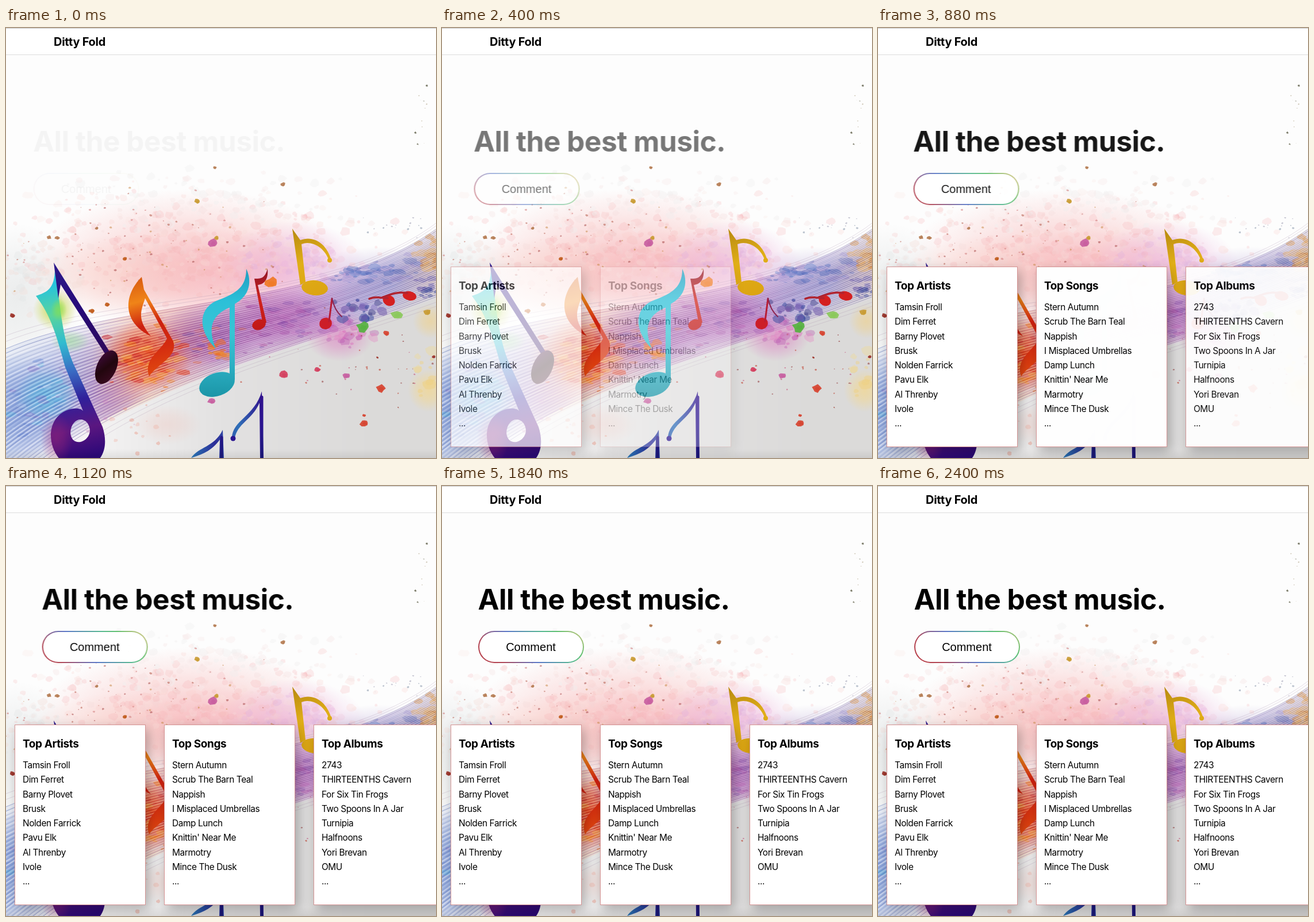
These frames come from a looping animation (748 px wide and 748 px high, 2480 ms). An HTML page with a canvas:

```html
<!DOCTYPE html>
<html lang="en">
<head>
<meta charset="utf-8">
<title>Ditty Fold</title>
<style>
  html, body { margin: 0; width: 100%; height: 100%; overflow: hidden; background: #fdfdfd; }
  body { position: relative; font-family: Inter, "Open Sans", sans-serif; color: #000; }
  canvas { position: absolute; left: 0; top: 0; width: 748px; height: 748px; }

  header {
    position: absolute; left: 0; top: 0; width: 748px; height: 47px; box-sizing: border-box;
    background: #fff; border-top: 1px solid #c9c9c9; border-bottom: 1px solid #dcdcdc;
  }
  header b { position: absolute; left: 83px; top: 13px; font-size: 20px; line-height: 20px; letter-spacing: -.3px; }

  .hero {
    position: absolute; left: 62.5px; top: 169px;
    animation: slide 2480ms infinite;
    animation-timing-function: linear(.035, .2 6.5%, .53 16.1%, .81 25.8%, .91 35.5%, .98 45%, 1 55%, 1);
  }
  h1 { margin: 0; font-size: 49.6px; line-height: 56px; font-weight: 700; letter-spacing: -.5px; white-space: nowrap; }
  .button {
    position: absolute; left: 0; top: 83px; width: 184px; height: 56px; box-sizing: border-box;
    border: 2px solid transparent; border-radius: 28px;
    font: 20px/52px "Liberation Sans", Arial, sans-serif; text-align: center;
    background:
      linear-gradient(#fff, #fff) padding-box,
      linear-gradient(45deg, #b8404a 8%, #b04858 20%, #5a78c8 42%, #55b890 64%, #5fc070 74%, #d8c480 92%) 0 0 / 120% 100% border-box;
    animation: hue 2480ms linear infinite;
  }

  .card {
    position: absolute; top: 415px; width: 228px; height: 314px; box-sizing: border-box;
    padding: 20px 0 0 13px; border: 1px solid #d69494; background: #fff;
    box-shadow: 5px 8px 20px rgba(0, 0, 0, .28);
    animation: 2480ms infinite;
  }
  .card:nth-of-type(1) { left: 15px; animation-name: first; }
  .card:nth-of-type(2) { left: 275px; animation-name: second; }
  .card:nth-of-type(3) { left: 535px; animation-name: third; }
  h2 { margin: 0 0 12px; font-size: 19px; line-height: 25px; font-weight: 700; letter-spacing: -.4px; }
  ul { margin: 0; padding: 0; list-style: none; font-size: 15.4px; line-height: 25.25px; letter-spacing: -.4px; white-space: nowrap; }

  @keyframes slide { from { opacity: 0; transform: translateX(-16px); } to { opacity: 1; transform: none; } }
  @keyframes hue { from { background-position: 0 0, 90% 0; } to { background-position: 0 0, 10% 0; } }
  @keyframes first { 0%, 4.84% { opacity: 0; animation-timing-function: ease; } 32.3%, 100% { opacity: 1; } }
  @keyframes second { 0%, 10.9% { opacity: 0; animation-timing-function: ease; } 38.3%, 100% { opacity: 1; } }
  @keyframes third { 0%, 16.9% { opacity: 0; animation-timing-function: ease; } 44.4%, 100% { opacity: 1; } }
</style>
</head>
<body>
<canvas width="748" height="748"></canvas>
<header><b>Ditty Fold</b></header>
<div class="hero">
  <h1>All the best music.</h1>
  <div class="button">Comment</div>
</div>
<section class="card">
  <h2>Top Artists</h2>
  <ul><li>Tamsin Froll<li>Dim Ferret<li>Barny Plovet<li>Brusk<li>Nolden Farrick<li>Pavu Elk<li>Al Threnby<li>Ivole<li>...</ul>
</section>
<section class="card">
  <h2>Top Songs</h2>
  <ul><li>Stern Autumn<li>Scrub The Barn Teal<li>Nappish<li>I Misplaced Umbrellas<li>Damp Lunch<li>Knittin' Near Me<li>Marmotry<li>Mince The Dusk<li>...</ul>
</section>
<section class="card">
  <h2>Top Albums</h2>
  <ul><li>2743<li>THIRTEENTHS Cavern<li>For Six Tin Frogs<li>Two Spoons In A Jar<li>Turnipia<li>Halfnoons<li>Yori Brevan<li>OMU<li>...</ul>
</section>

<script>
const ctx = document.querySelector('canvas').getContext('2d');
const TAU = Math.PI * 2;

let seed = 41;
const rnd = () => {
  seed = (seed * 1664525 + 1013904223) >>> 0;
  return seed / 4294967296;
};
const spread = () => rnd() + rnd() + rnd() - 1.5;
const pick = list => list[Math.floor(rnd() * list.length)];

function ramp(x0, y0, x1, y1, stops) {
  const g = ctx.createLinearGradient(x0, y0, x1, y1);
  stops.forEach((c, i) => g.addColorStop(i / (stops.length - 1), c));
  return g;
}

// Soft elliptical stain
function wash(x, y, rx, ry, color, alpha) {
  ctx.save();
  ctx.translate(x, y);
  ctx.scale(rx, ry);
  const g = ctx.createRadialGradient(0, 0, 0, 0, 0, 1);
  g.addColorStop(0, color);
  g.addColorStop(.45, color + 'b0');
  g.addColorStop(1, color + '00');
  ctx.globalAlpha = alpha;
  ctx.fillStyle = g;
  ctx.fillRect(-1, -1, 2, 2);
  ctx.restore();
}

// Ragged patch of paint
function blot(x, y, r, color, alpha = 1, flat = .8) {
  ctx.globalAlpha = alpha;
  ctx.fillStyle = color;
  ctx.beginPath();
  for (let i = 0; i < 9; i++) {
    const a = i / 9 * TAU, d = r * (.75 + rnd() * .5);
    ctx.lineTo(x + d * Math.cos(a), y + d * Math.sin(a) * flat);
  }
  ctx.fill();
  ctx.globalAlpha = 1;
}

function spray(n, x, y, sx, sy, r, colors, alpha, flat) {
  for (let i = 0; i < n; i++) {
    blot(x + spread() * sx, y + spread() * sy, r * (.3 + rnd()), pick(colors), alpha, flat);
  }
}

function shape(d, fill) {
  ctx.fillStyle = fill;
  ctx.fill(new Path2D(d));
}

function line(d, width, color) {
  ctx.lineWidth = width;
  ctx.strokeStyle = color;
  ctx.stroke(new Path2D(d));
}

function oval(x, y, rx, ry, turn, fill) {
  ctx.fillStyle = fill;
  ctx.beginPath();
  ctx.ellipse(x, y, rx, ry, turn, 0, TAU);
  ctx.fill();
}

// Stave lanes run between an upper (k = 0) and a lower (k = 1) curve
const upper = [-5, 560, 200, 470, 560, 490, 755, 345];
const lower = [-5, 815, 200, 615, 480, 570, 755, 465];
const lane = k => upper.map((v, i) => v + (lower[i] - v) * k);
const lanePath = k => {
  const [x, y, ...rest] = lane(k);
  return `M${x} ${y}C${rest}`;
};
const ribbon = (a, b) => {
  const p = lane(b);
  return `${lanePath(a)}L${p[6]} ${p[7]}C${p[4]} ${p[5]} ${p[2]} ${p[3]} ${p[0]} ${p[1]}Z`;
};

function paper() {
  ctx.fillStyle = '#fdfdfd';
  ctx.fillRect(0, 0, 748, 748);
  ctx.filter = 'blur(9px)';
  shape(lanePath(.85) + 'L770 480V770H0Z', ramp(120, 0, 640, 0, ['#f6f5f5', '#e2e1e1', '#dbdad9']));
  ctx.filter = 'none';
  wash(20, 470, 120, 130, '#dfe2e2', .6);
  wash(320, 405, 270, 125, '#f8bcbc', .68);
  wash(370, 430, 180, 80, '#f5a3b0', .45);
  wash(500, 420, 130, 85, '#e6a6d8', .55);
  wash(650, 430, 120, 50, '#c3b5dc', .5);
  wash(200, 430, 160, 70, '#f7c0b4', .35);
  spray(480, 310, 385, 290, 95, 7, ['#f6b8b8', '#f9cfc9', '#f5abb0', '#fbe3df', '#f3d6d6'], .22);
  spray(90, 350, 300, 240, 50, 7, ['#f1eeee', '#f8ecec', '#f1f0f0'], .4);
  spray(80, 50, 430, 80, 50, 7, ['#e3e4e4', '#eceaea', '#f3dcd8'], .35);
  spray(70, 520, 400, 90, 40, 7, ['#eab4de', '#f2c4dc', '#dcaee0'], .28);
}

function stave() {
  const hues = ramp(0, 0, 748, 0, ['#9fb2e0', '#8a9cd6', '#a086bd', '#dc6a58', '#c0688a', '#9a60a8', '#a868b4', '#b884c6', '#9a90cc', '#8a8cc8', '#c0a09c']);
  ctx.globalAlpha = .2;
  for (let i = 0; i < 6; i++) shape(ribbon(.08 * i, .97 - .06 * i), hues);
  ctx.globalAlpha = 1;

  ctx.save();
  ctx.clip(new Path2D(ribbon(0, .98)));
  wash(20, 655, 120, 90, '#6f8ed2', .6);
  wash(70, 640, 55, 50, '#55bde0', .7);
  wash(245, 570, 80, 60, '#e84a1c', .9);
  wash(180, 650, 70, 60, '#a06ac0', .5);
  wash(350, 535, 90, 55, '#8c409a', .5);
  wash(480, 505, 110, 50, '#a34aa0', .55);
  spray(45, 60, 645, 60, 60, 9, ['#5cbfe2', '#6d8cd4', '#8a78c8', '#b8c8ec'], .4, .4);
  spray(70, 245, 575, 65, 45, 10, ['#e8380e', '#f47a1a', '#d42a2a', '#f6a03c'], .55, .4);
  spray(60, 370, 545, 80, 40, 9, ['#8c449c', '#b0509a', '#e07040', '#6a4aa8', '#c88ac8'], .45, .35);
  spray(55, 490, 500, 90, 35, 9, ['#9a3e9c', '#b85ab0', '#7a4aa8', '#c67cc0'], .4, .4);
  spray(40, 650, 425, 80, 25, 10, ['#4a62b4', '#6a86cc', '#8a7ac4', '#a79ad4'], .45, .4);
  spray(30, 738, 395, 30, 25, 10, ['#e8a044', '#d88430', '#f0bc70'], .6, .6);
  spray(20, 735, 455, 25, 18, 8, ['#2f3f94', '#4a3a98', '#6a62b0'], .55, .5);
  ctx.restore();

  const ink = ramp(0, 0, 748, 0, ['#3f5cae', '#4a3c9c', '#a83a3c', '#7a2f80', '#7c3488', '#6f5a98', '#54548c']);
  const light = ramp(0, 0, 748, 0, ['#f4f7ff', '#ece8fa', '#f6c49c', '#dcb0dc', '#d9a6dc', '#d2c0e8', '#e0d4e8']);
  for (let i = 0; i < 34; i++) {
    const k = i / 33;
    ctx.globalAlpha = .15 + .45 * rnd();
    line(lanePath(k), 1, ink);
    ctx.globalAlpha = .2 + .45 * rnd();
    line(lanePath(k + .014), 1.6, light);
  }
  ctx.globalAlpha = .35;
  [-.09, -.05, 1.08, 1.14].forEach(k => line(lanePath(k), .8, '#a58aa8'));
  ctx.globalAlpha = 1;
}

function stains() {
  wash(85, 490, 38, 36, '#c8d84a', .8);
  wash(112, 545, 34, 20, '#9ddc9a', .6);
  wash(580, 535, 60, 45, '#dc6abc', .5);
  wash(735, 630, 36, 38, '#f4d78c', .7);
  wash(738, 510, 30, 30, '#f2d080', .55);
  wash(280, 690, 60, 35, '#f2b4a8', .25);
  spray(26, 590, 530, 50, 32, 8, ['#d85ab4', '#e684c4', '#b854b0'], .35);
  spray(26, 610, 487, 45, 22, 8, ['#35489c', '#6a52a8', '#8a7ac4', '#46468c'], .5);
  spray(18, 620, 425, 45, 14, 9, ['#6a8ad0', '#4a66b8'], .4, .5);
  spray(14, 730, 610, 18, 45, 9, ['#f0d080', '#eeda9e'], .45);
  spray(12, 372, 562, 22, 14, 8, ['#f08a28', '#e86a30'], .6, .5);
  spray(22, 210, 690, 70, 40, 4, ['#e8846c', '#c884c0', '#f0b0a0'], .35);
  spray(110, 240, 385, 220, 85, 1.8, ['#b45a48', '#c88a4a', '#a84848', '#d07878'], .55);
  spray(35, 610, 590, 150, 85, 1.6, ['#c04838', '#c85a80', '#9a4a4a'], .65);
  spray(8, 722, 150, 12, 50, 1.2, ['#8a8a78', '#a09070'], .5);
  spray(20, 690, 345, 60, 18, 1.5, ['#7a8aa0', '#9a9ab0'], .5);
}

function notes() {
  ctx.lineCap = 'round';
  // large cyan to violet note
  shape('M52 466C70 460 86 455 85 415L91 462C98 520 104 560 124 598L168 694C177 722 172 748 150 760H104C70 735 68 680 106 665C118 660 130 661 134 666L103 590C88 535 78 500 52 466ZM112 704C114 730 145 722 146 700C144 674 114 674 112 704Z',
    ramp(70, 450, 135, 748, ['#28c4dc', '#5ad49c', '#30bcd0', '#3a6cc4', '#30209a', '#5a1680', '#2c0878']));
  shape('M83 408L182 566L175 571L95 446L91 470Z', ramp(83, 408, 180, 570, ['#2c1a8c', '#260a78', '#2e0a58']));
  oval(175, 590, 17, 31, .42, ramp(160, 570, 190, 610, ['#3c0a38', '#22060e', '#3a0a20']));
  wash(88, 715, 28, 45, '#a02878', .45);
  wash(92, 490, 14, 20, '#8ae04a', .7);

  // flame coloured note
  shape('M236 433C204 465 202 512 252 536C226 505 236 490 242 470L280 540C272 560 238 575 249 606C262 585 300 572 291 545L240 455Z',
    ramp(225, 433, 270, 600, ['#d85a10', '#f08418', '#cc2010', '#d42c10', '#e04810']));

  // teal note
  const teal = ramp(0, 420, 0, 640, ['#209cc0', '#2cc0d8', '#38c4d4', '#2cb0c4', '#1c96a8']);
  shape('M418 419C418 455 395 463 365 475C333 490 335 528 365 558C350 520 358 500 389 486V612H398V480C425 465 428 440 418 419Z', teal);
  oval(367, 620, 32, 20, -.35, teal);

  // small red note
  const red = ramp(430, 420, 450, 525, ['#8c1428', '#d0241c', '#c01818']);
  shape('M432 436C448 437 451 431 455 419C457 440 447 446 438 447L453 512L447 516Z', red);
  oval(440, 516, 12, 9, -.35, red);

  // gold note
  const gold = ramp(500, 350, 540, 465, ['#b88a10', '#e0ae18', '#dca412']);
  shape('M498 349L512 369C535 360 558 375 566 404L562 405C554 380 530 369 514 376L521 442L512 447Z', gold);
  oval(537, 452, 23, 13, .1, gold);
  oval(563, 404, 4, 4, 0, gold);

  // little red pair on the right
  oval(556, 514, 11, 10, -.3, '#cc1e28');
  line('M562 510L567 471', 3, '#b81c34');
  line('M567 470C570 485 576 495 584 502', 2, '#8c2450');
  oval(666, 474, 11, 9, .5, '#d42020');
  oval(702, 466, 12, 8, .2, '#d42020');
  line('M632 471C645 466 652 470 664 470M656 468C668 464 680 458 698 461', 3.5, '#b02430');

  // blue notes at the foot
  const blue = ramp(0, 633, 0, 748, ['#30108c', '#2a1490', '#1a1878']);
  const tail = ramp(322, 0, 446, 0, ['#2a7ab8', '#2c2c98', '#2f70b8', '#30108c']);
  shape('M377 699L379 748H371L372 716C358 736 340 742 322 748C335 728 362 730 377 699Z', tail);
  line('M375 712V748', 5, blue);
  shape('M445 632L448 748H442L441 652C428 682 402 688 398 714L393 713C394 682 432 676 445 632Z', tail);
  line('M445 642V748', 5, blue);
  oval(395, 714, 4.5, 4.5, 0, '#2a1490');
}

function drops() {
  const sets = {
    '#c89a30': [332, 301, 5, 366, 365, 4, 733, 494, 6],
    '#b47a50': [482, 272, 4, 75, 364, 4, 89, 365, 4, 158, 348, 3, 363, 243, 3],
    '#c05a18': [207, 401, 4, 149, 492, 5, 176, 481, 4],
    '#9a2e24': [11, 500, 5, 646, 573, 2, 682, 660, 1, 744, 572, 3],
    '#c75c9e': [360, 374, 9, 592, 605, 6, 357, 649, 6],
    '#f07820': [462, 443, 11],
    '#d43c5c': [483, 603, 8, 542, 594, 5],
    '#d6402c': [652, 627, 8, 623, 687, 7, 623, 674, 3, 661, 531, 5],
    '#52b03c': [621, 520, 11],
    '#88c858': [680, 499, 10],
    '#70705c': [712, 182, 2, 716, 202, 1.5, 732, 100, 2]
  };
  for (const [color, list] of Object.entries(sets)) {
    for (let i = 0; i < list.length; i += 3) {
      blot(list[i], list[i + 1], list[i + 2], color, .9);
      blot(list[i] + 1, list[i + 1] + 1, list[i + 2] * .5, color, .6);
    }
  }
  ctx.fillStyle = ramp(0, 732, 0, 748, ['#00000000', '#00000012']);
  ctx.fillRect(0, 732, 748, 16);
}

[paper, stave, stains, notes, drops].forEach(paint => paint());
</script>
</body>
</html>
```
